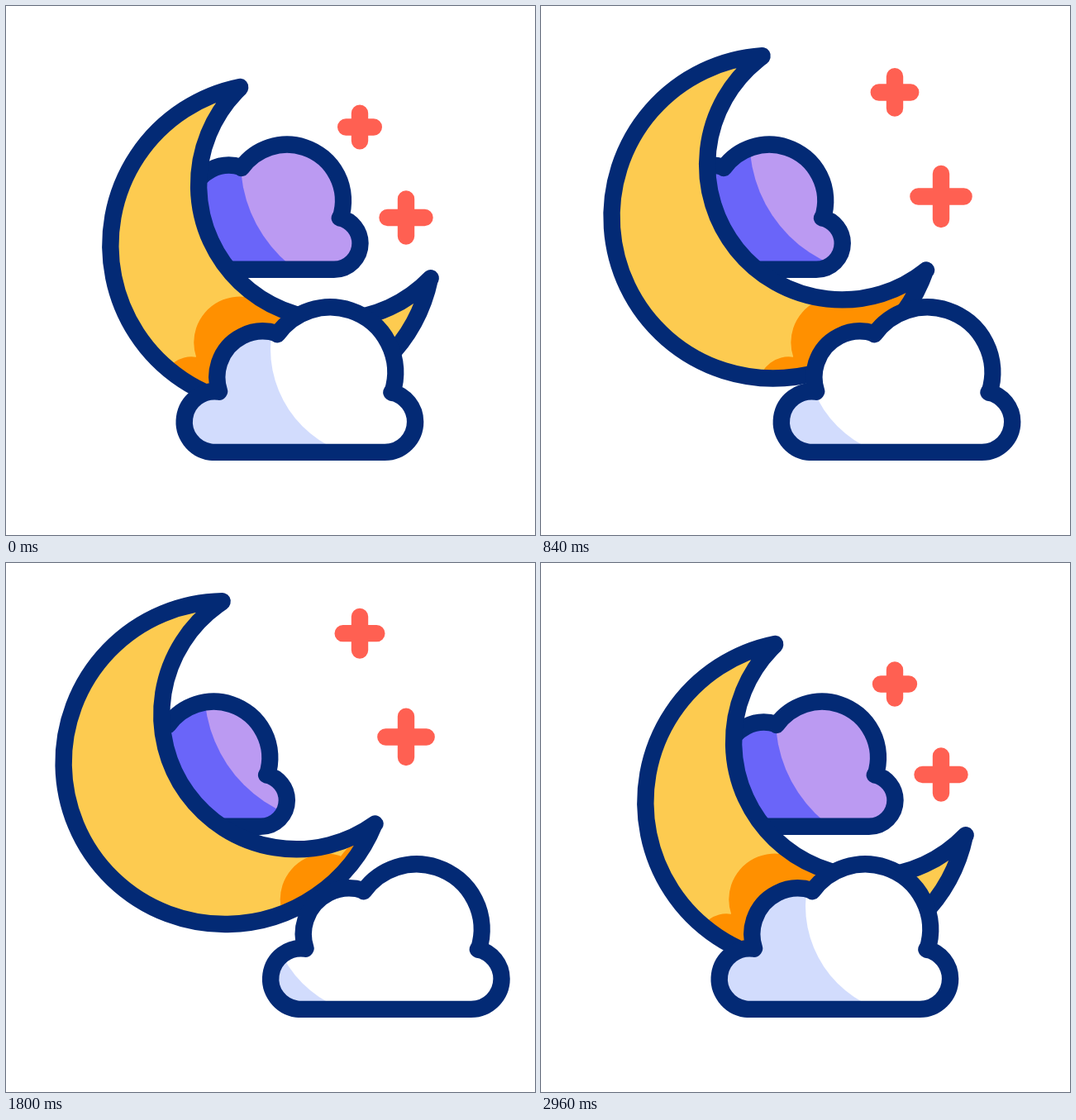
An HTML page with a canvas that plays this animation: 640 by 640 pixels, repeating every 3000 ms.

```html
<!DOCTYPE html>
<html lang="en">
<head>
<meta charset="utf-8">
<title>Moon and clouds</title>
<style>
  html, body { margin: 0; width: 100%; height: 100%; overflow: hidden; background: #fff; }
  canvas { display: block; width: 640px; height: 640px; }
</style>
</head>
<body>
<canvas id="stage"></canvas>
<script>
const LOOP = 3000, STEP = 40, LINE = 20.4;
const NAVY = '#032a75', YELLOW = '#fdcb50', ORANGE = '#ff9000', RED = '#ff6052';
const VIOLET = '#6a65f9', LILAC = '#bb9af2', PALE = '#d2dcfd', WHITE = '#fff';

const canvas = document.getElementById('stage');
const ctx = canvas.getContext('2d');
const ratio = window.devicePixelRatio || 1;
canvas.width = canvas.height = 640 * ratio;

const rad = deg => deg * Math.PI / 180;
const clamp = x => Math.min(1, Math.max(0, x));
const smooth = x => { x = clamp(x); return x * x * (3 - 2 * x); };

// Symmetric cubic-bezier(.64, 0, .36, 1)
function drift(x) {
  x = clamp(x);
  let lo = 0, hi = 1;
  for (let i = 0; i < 30; i++) {
    const s = (lo + hi) / 2, r = 1 - s;
    if (3 * 0.64 * s * r * r + 3 * 0.36 * s * s * r + s * s * s < x) lo = s; else hi = s;
  }
  return smooth(lo);
}

// Rises over [a, b], falls back over [c, d]
const swing = (ease, t, a, b, c, d) => ease((t - a) / (b - a)) - ease((t - c) / (d - c));

// Repeated grow and shrink
function pulse(t, start, period) {
  const u = (t - start) / period;
  if (u < 0) return 0;
  return smooth(1 - Math.abs(2 * (u % 1) - 1));
}

// Cloud around the centre of its large bump
function cloud(x, y, k = 1) {
  const p = new Path2D();
  const bump = (dx, dy, r, from, to) =>
    p.arc(x + dx * k, y + dy * k, r * k, rad(from), rad(to), true);
  bump(66, 59.8, 36.8, 90, -77.3);
  bump(0, 0, 78.9, 18.2, -144.3);
  bump(-81.5, 5.7, 55.5, -71.9, -198);
  bump(-139.8, 59.8, 36.8, -82, -270);
  p.closePath();
  return p;
}

const moon = new Path2D();
moon.arc(0, 0, 195.4, rad(-101.4), rad(11.9), true);
moon.arc(74.3, -73, 163, rad(43.8), rad(226.1));
moon.closePath();

function disc(x, y, r, color) {
  ctx.fillStyle = color;
  ctx.beginPath();
  ctx.arc(x, y, r, 0, 2 * Math.PI);
  ctx.fill();
}

function shape(path, color, shade) {
  ctx.fillStyle = color;
  ctx.fill(path);
  ctx.save();
  ctx.clip(path);
  shade();
  ctx.restore();
  ctx.strokeStyle = NAVY;
  ctx.stroke(path);
}

function star(x, y, half) {
  const a = half - LINE / 2;
  ctx.strokeStyle = RED;
  ctx.beginPath();
  ctx.moveTo(x - a, y);
  ctx.lineTo(x + a, y);
  ctx.moveTo(x, y - a);
  ctx.lineTo(x, y + a);
  ctx.stroke();
}

function draw(t) {
  const p = swing(drift, t, 205, 1390, 1390, 2575);
  ctx.setTransform(ratio, 0, 0, ratio, 0, 0);
  ctx.fillStyle = WHITE;
  ctx.fillRect(0, 0, 640, 640);
  ctx.lineWidth = LINE;
  ctx.lineCap = ctx.lineJoin = 'round';

  shape(cloud(340 - 106.7 * p, 235.6, 0.861), VIOLET,
    () => disc(446.3 - 52.5 * p, 187.5 - 41 * p, 162.5, LILAC));

  const frontX = 392.3 + 125.7 * p, frontY = 443.3;
  const place = new DOMMatrix()
    .translate(321.75 - 68.3 * p, 289.5 - 57.6 * p)
    .rotate(12.54 * p);
  const body = new Path2D();
  body.addPath(moon, place);
  shape(body, YELLOW, () => {
    ctx.fillStyle = ORANGE;
    ctx.fill(cloud(frontX - 28, frontY - 42));
  });

  shape(cloud(frontX, frontY), PALE, () => {
    disc(452.2, 415, 132.2, WHITE);
    ctx.fillRect(452, 300, 188, 300);
  });

  star(428, 146.5 - 76.5 * swing(smooth, t, 200, 1400, 1400, 2800),
    27 + 10 * pulse(t, 0, 1000));
  star(484, 256 - 51 * swing(smooth, t, 200, 1480, 1500, 2980),
    32.7 + 9.5 * pulse(t, 200, 2600 / 3) * (t < 2800));
}

const start = performance.now();
function tick() {
  const t = (performance.now() - start) % LOOP;
  draw(Math.floor(t / STEP) * STEP);
  requestAnimationFrame(tick);
}
tick();
</script>
</body>
</html>
```
